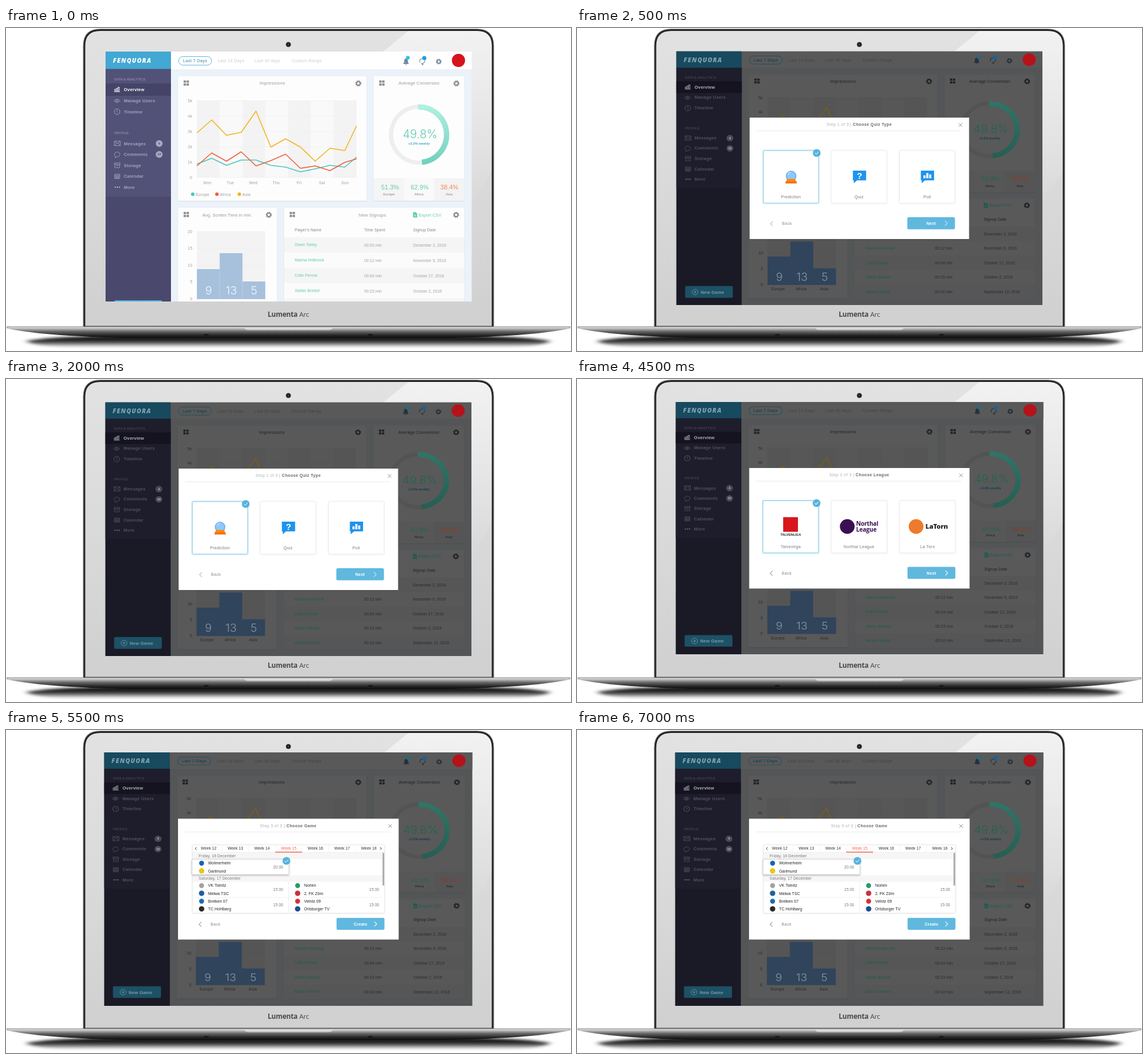
Recreate the animation shown at these times as an HTML page. Size 959 by 548 pixels, loop 8 s.

```html
<!DOCTYPE html>
<html lang="en">
<head>
<meta charset="utf-8">
<title>Dashboard on a laptop</title>
<style>
html, body { margin: 0; width: 100%; height: 100%; overflow: hidden; background: #fff; }
svg { display: block; width: 959px; height: 548px; }
text { font-family: "Liberation Sans", Arial, sans-serif; white-space: pre; }
.light { font-family: Inter, "Liberation Sans", sans-serif; font-weight: 300; }
.brand { font-family: "Open Sans", "Noto Sans", sans-serif; }
.scene { visibility: hidden; animation: 8s step-end infinite; }
#s0 { animation-name: s0; }
#s1 { animation-name: s1; }
#s2 { animation-name: s2; }
#s3 { animation-name: s3; }
@keyframes s0 { 0% { visibility: visible } 6.25%, 100% { visibility: hidden } }
@keyframes s1 { 0% { visibility: hidden } 6.25% { visibility: visible } 37.5%, 100% { visibility: hidden } }
@keyframes s2 { 0% { visibility: hidden } 37.5% { visibility: visible } 68.75%, 100% { visibility: hidden } }
@keyframes s3 { 0% { visibility: hidden } 68.75%, 100% { visibility: visible } }
</style>
</head>
<body>
<svg id="stage" viewBox="0 0 959 548" xmlns="http://www.w3.org/2000/svg"></svg>
<script>
const rect = (x, y, w, h, fill, more = '') =>
  `<rect x="${x}" y="${y}" width="${w}" height="${h}" fill="${fill}" ${more}/>`;
const dot = (x, y, r, fill, more = '') =>
  `<circle cx="${x}" cy="${y}" r="${r}" fill="${fill}" ${more}/>`;
const path = (d, fill, more = '') => `<path d="${d}" fill="${fill}" ${more}/>`;
const line = (d, stroke, w = 1, more = '') =>
  path(d, 'none', `stroke="${stroke}" stroke-width="${w}" ${more}`);
// y is the middle of the capitals
const text = (x, y, s, size, fill, more = '', ls = 0.2) =>
  `<text x="${x}" y="${y + size * 0.36}" font-size="${size}" fill="${fill}" letter-spacing="${ls}" ${more}>${s}</text>`;
const MID = 'text-anchor="middle" ';
const END = 'text-anchor="end" ';
const BOLD = 'font-weight="700" ';

const dim = c => c.replace(/[0-9a-f]{2}/gi, h =>
  Math.round(parseInt(h, 16) * 0.35).toString(16).padStart(2, '0'));

const gear = (x, y, r, c) =>
  dot(x, y, r * 0.62, 'none', `stroke="${c}" stroke-width="${r * 0.42}"`) +
  dot(x, y, r * 0.9, 'none', `stroke="${c}" stroke-width="${r * 0.3}" stroke-dasharray="${r * 0.36} ${r * 0.347}"`);
const tiles = (x, y, c) => [0, 5].map(i => [0, 5].map(j => rect(x + i, y + j, 4, 3.8, c)).join('')).join('');

function sidebar(k) {
  const muted = k('#a3a2c0', '#50505f'), white = k('#ffffff', '#b4b4bc');
  const items = [['Manage Users', 123], ['Timeline', 142], ['Messages', 196], ['Comments', 214],
    ['Storage', 233], ['Calendar', 251.5], ['More', 270]];
  const stroke = d => line(d, muted, 0.9);
  let s = rect(169, 40, 111, 460, k('#4a496d', '#1a1926')) + rect(169, 69, 111, 217, k('#525177', '#1e1d2b')) +
    rect(169, 94, 111, 21, k('#454468', '#14131f')) + rect(169, 40, 111, 29.5, k('#43a8d3', '#17495f')) +
    text(181.5, 55.5, 'FENQUORA', 10.5, k('#ffffff', '#7fa3b0'), 'font-weight="800" font-style="italic" class="brand"', 1.1) +
    text(184, 87, 'DATA &amp; ANALYTICS', 5.6, muted, '', 0.1) + text(184, 178, 'PROFILE', 5.6, muted, '', 0.1) +
    text(200, 104.5, 'Overview', 7.5, white, BOLD);
  for (const [name, y] of items) s += text(200, y, name, 7.5, muted, BOLD);
  s += [0, 1, 2].map(i => rect(184.3 + i * 3, 104 - i * 1.8, 2, 4 + i * 1.8, 'none', `stroke="${white}" stroke-width=".8"`)).join('') +
    stroke('M183.500 108.500h10.500M183 123.500q5-5.500 10.500 0q-5.500 5.500-10.500 0') + dot(188.3, 123.5, 1.6, 'none', `stroke="${muted}"`) +
    dot(188.5, 142, 4.8, 'none', `stroke="${muted}"`) + stroke('M188.500 138.800v3.500l1.500 1.500') +
    stroke('M184 192h10v7.500h-10zM184 192l5 4l5-4M184 199.500l3.500-4M194 199.500l-3.500-4') +
    stroke('M185.500 217.500a4.700 4 0 1 1 3 1l-3 1.500z') +
    stroke('M184 229h9.500v2.500h-9.500zM184.700 231.500v5.500h8v-5.500M187 233.500h3.500') +
    stroke('M184.500 248h8.500v7.500h-8.500zM184.500 250.300h8.500M187.300 250v5.500M190.200 250v5.500M184.500 253h8.500') +
    [185.5, 189, 192.5].map(x => dot(x, 270, 1.1, k('#c5c4d8', '#70707c'))).join('');
  for (const [n, y] of [['4', 196], ['10', 214.5]])
    s += dot(260, y, 5.8, k('#a9a8c4', '#4a4a57')) + text(260, y, n, 5.5, k('#525177', '#c0c0c8'), MID + BOLD, 0);
  return s + rect(184, 462, 81, 21, k('#4fb3dc', '#1d5166'), 'rx="2"') +
    dot(201, 472.8, 5, 'none', `stroke="${k('#ffffff', '#7b9aa6')}" stroke-width=".8"`) +
    line('M198.500 472.800h5M201 470.300v5', k('#ffffff', '#7b9aa6'), 0.8) +
    text(210.5, 473, 'New Game', 7.5, k('#ffffff', '#7b9aa6'), BOLD);
}

function topBar(k) {
  const icon = k('#6d8ba3', '#25323c');
  let s = rect(280, 40, 511, 30, k('#ffffff')) +
    rect(293, 48.5, 56, 14.5, k('#ffffff'), `rx="7.2" stroke="${k('#63b7da', '#1e5067')}" stroke-width="1"`) +
    text(321, 55.5, 'Last 7 Days', 7.4, k('#3c86ad', '#12384a'), MID);
  for (const [x, name] of [[382, 'Last 14 Days'], [444, 'Last 30 days'], [510.5, 'Custom Range']])
    s += text(x, 55.5, name, 7.3, k('#cccccc', '#444444'), MID);
  return s + path('M674 61q2-2 2-6q0-3 3-3.500q3 .5 3 3.500q0 4 2 6zM677.500 61.700h3l-1.500 1.500z', icon) +
    dot(682, 50.5, 3.2, k('#35c3de', '#1f6d80')) +
    line('M703 58.500a4.500 4 0 1 1 4 1.500l1 3l-3-3', icon, 1.1) + dot(710, 51, 3.5, k('#1e9be8', '#17639a')) +
    gear(734.5, 57, 4.6, icon) + dot(768, 55, 11.2, k('#d6141d', '#b5121a'));
}

function lineChart(k) {
  const soft = k('#a0a0a0', '#2d2d2d'), days = ['Mon', 'Tue', 'Wed', 'Thu', 'Fri', 'Sat', 'Sun'];
  const plots = [
    ['#4fc6be', '#24605c', [231, 221, 233, 224, 224, 233, 236, 244, 239, 233, 236, 219]],
    ['#f0603f', '#7a2f20', [234, 212, 226, 210, 234, 225, 214, 238, 234, 242, 228, 222]],
    ['#f2b51f', '#7c5e12', [178, 156, 182, 177, 141, 202, 188, 202, 226, 204, 208, 166]]];
  let s = text(452, 93.5, 'Impressions', 7.5, k('#999999', '#222222'), MID, 0.3);
  days.forEach((d, i) => s += rect(324 + i * 38.7, 123, 38.7, 131, k(i % 2 ? '#f9f9f9' : '#f3f3f3')) +
    text(342 + i * 38.9, 263, d, 6.8, soft, MID));
  ['5k', '4k', '3k', '2k', '1k', '0'].forEach((v, i) => s += text(316, 123.500 + i * 26, v, 6.8, soft, END) +
    line(`M324 ${123.500 + i * 26}h271`, k('#efefef'), 0.6));
  for (const [c, d, ys] of plots)
    s += line('M' + ys.map((y, i) => `${Math.min(324 + i * 25.1, 595)} ${y}`).join('L'), k(c, d), 1.6, 'stroke-linejoin="round"');
  [['Europe', 317], ['Africa', 358], ['Asia', 396]].forEach(([n, x], i) =>
    s += dot(x, 282, 3, k(plots[i][0], plots[i][1])) + text(x + 5, 282.3, n, 6.8, soft));
  return s;
}

function donut(k, id) {
  const green = k('#62c9b0', '#1f6454');
  let s = text(701, 93.5, 'Average Conversion', 7.5, k('#999999', '#222222'), MID, 0.1) +
    dot(701, 181, 47.5, 'none', `stroke="${k('#eeeeee')}" stroke-width="7"`) +
    `<linearGradient id="ring${id}" x1="0" y1="0" x2="0" y2="1"><stop stop-color="${k('#aef0e1', '#2f7565')}"/>` +
    `<stop offset="1" stop-color="${k('#74d0bd', '#265f53')}"/></linearGradient>` +
    line('M699.500 134A47 47 0 0 1 706 227.700', `url(#ring${id})`, 9) +
    text(703, 179.5, '49.8%', 19.5, green, MID + 'class="light"', 0) +
    text(701, 196.3, '+3.2% weekly', 5.7, k('#46a9d6', '#153c4e'), MID + BOLD, 0);
  [['51.3%', 'Europe', '#f5f5f5'], ['62.9%', 'Africa', '#f9f9f9'], ['38.4%', 'Asia', '#f3f3f3']].forEach(([v, n, bg], i) =>
    s += rect(624 + i * 51.4, 255, 51.4, 38, k(bg)) +
      text(652 + i * 50.3, 270, v, 10.6, i < 2 ? green : k('#f2875a', '#8c3c25'), MID, 0.1) +
      text(650 + i * 51, 281.7, n, 6, k('#888888', '#222222'), MID, 0));
  return s;
}

function barChart(k) {
  const soft = k('#a0a0a0', '#2a2a2a');
  let s = text(375.5, 317, 'Avg. Screen Time in min.', 7.5, k('#999999', '#222222'), MID, 0.05) +
    rect(324, 345, 116, 115, k('#f3f3f3'));
  for (let i = 0; i < 5; i++) s += text(316.5, 345.500 + i * 28.5, 20 - i * 5, 6.8, soft, END) +
    line(`M324 ${345.500 + i * 28.5}h116`, k('#ebebeb'), 0.6);
  [['Europe', 9, 409], ['Africa', 13, 382], ['Asia', 5, 430]].forEach(([n, v, y], i) =>
    s += rect(324 + i * 38.7, y, 38.7, 460 - y, k('#a7c1dd', '#30445b')) +
      text(344 + i * 38.5, 445.5, v, 19, k('#f4f8fc', '#8b95a0'), MID + 'class="light"', 0) +
      text(342 + i * 39, 467.5, n, 6.8, soft, MID));
  return s;
}

function signups(k) {
  const green = k('#5ccbb0', '#1e5c4e'), soft = k('#a3a3a3', '#2c2c2c');
  const rows = [['Owen Tarley', '03', 'December 2, 2016'], ['Marina Holbrook', '12', 'November 9, 2016'],
    ['Colin Ferrow', '04', 'October 17, 2016'], ['Stefan Brinkel', '23', 'October 2, 2016'],
    ['Adrian Velmer', '10', 'September 12, 2016']];
  let s = text(622, 317, 'New Signups', 7.5, k('#999999', '#222222'), MID) +
    path('M691 312.500h4.500l2.500 2.500v6.500h-7z', green) + line('M692.500 317h4M692.500 319h4', k('#ffffff'), 0.7) +
    text(700.5, 317, 'Export CSV', 7, green) +
    text(490, 343, "Player's Name", 6.8, k('#888888', '#222222'), '', 0.1) +
    text(608, 343, 'Time Spent', 6.8, k('#888888', '#222222'), '', 0.1) +
    text(691, 342.3, 'Signup Date', 6.8, k('#888888', '#222222'), '', 0.1);
  rows.forEach(([n, m, d], i) => {
    const y = 368 + i * 26;
    s += rect(472, y - 13, 306, 26, k(i % 2 ? '#fbfbfb' : '#f5f5f5')) + text(490, y, n, 6.8, green, '', 0) +
      text(608, y + 0.3, `00:${m} min`, 6.8, soft, '', 0) + text(691, y + 0.3, d, 6.8, soft, '', 0);
  });
  return s;
}

function dashboard(id, dark) {
  const k = (c, d) => dark ? d || dim(c) : c;
  const icon = k('#8d8d8d', '#222222');
  let s = rect(169, 40, 622, 460, k('#ecf2f9')) + sidebar(k) + topBar(k);
  for (const [x, y, w, h, g] of [[292, 82, 320, 211, 598], [624, 82, 154, 211, 764.5], [292, 305, 168, 179, 446], [472, 305, 306, 179, 764]])
    s += rect(x - 0.5, y + 0.5, w + 1, h + 1, k('#dde4ec'), 'rx="1"') + rect(x, y, w, h, k('#fdfdfd'), 'rx="1"') +
      tiles(x + 9.5, y + 7, icon) + gear(g, y + 12, 5, icon);
  return s + lineChart(k) + donut(k, id) + barChart(k) + signups(k);
}

const check = (x, y) => dot(x, y, 6.6, '#55b3de') + line(`M${x - 3} ${y}l2.200 2.200l4-4.200`, '#fff', 1);

// drawn at 293,152 with size 373 x 206, then fitted to the box
function modal(x, y, w, h, step, title, button, body) {
  return `<g transform="translate(${x} ${y}) scale(${w / 373} ${h / 206}) translate(-293 -152)">` +
    rect(293, 152, 373, 206, '#fff') +
    text(479.3, 164, `Step ${step} of 3 | <tspan fill="#666" font-weight="700">${title}</tspan>`, 6.9, '#b0b0b0', MID, 0.42) +
    line('M648.500 161.500l6 6M654.500 161.500l-6 6', '#888', 0.9) + line('M304 174.500h348', '#e9ebee') + body +
    line('M332.500 328l-4 4l4 4', '#999') + text(348, 331.7, 'Back', 7, '#888', '', 0.35) +
    rect(561, 321, 81, 20.5, '#60b8df', 'rx="2.5"') + text(601.5, 331.5, button, 7, '#fff', MID + BOLD) +
    line('M625 327.500l4 4l-4 4', '#fff') + '</g>';
}

const options = (names, icons) => names.map((n, i) => {
  const x = 316.3 + i * 115.8;
  return rect(x, 208, 94, 89, '#fff', `rx="1" stroke="${i ? '#eeeeee' : '#86cbe8'}" filter="url(#${i ? 'soft' : 'glow'})"`) +
    icons[i] + text(x + 47, 286, n, 7, '#777', MID, 0.3);
}).join('') + check(407, 212);

const bubble = x => path(`M${x} 242h22.500v16.500h-15.500l-5.500 5v-5h-1.500z`, '#1f93ee');
const quizTypes = options(['Prediction', 'Quiz', 'Poll'], [
  dot(363.5, 251, 9, '#72b5f3') + dot(363.5, 251, 7, '#8fc8fa') + line('M358 249q1.500-4 5-4.500', '#d8eeff', 1.2) +
    path('M356.500 256h14l2.500 7.500h-19z', '#ff8a0f') + rect(354, 260.5, 19, 3, '#f26d0c'),
  bubble(468.5) + text(479.8, 250.5, '?', 15, '#fff', MID + BOLD, 0),
  bubble(584) + rect(588.5, 250, 3.5, 5, '#fff') + rect(593.3, 246, 3.5, 9, '#fff') + rect(598.2, 248.5, 3.5, 6.5, '#fff')]);

const leagues = options(['Talvenliga', 'Northal League', 'La Torn'], [
  rect(350.5, 236, 25, 25, '#d8161e') + text(363.3, 266, 'TALVENLIGA', 5.6, '#222', MID + BOLD, 0),
  dot(459, 252, 12.5, '#3b1053') + text(474, 247.5, 'Northal', 10, '#3b1053', BOLD + 'class="brand"', -0.2) +
    text(474, 257.5, 'League', 10, '#3b1053', BOLD + 'class="brand"', -0.2),
  dot(575.5, 252, 12.5, '#ee7a2b') + text(591.5, 252, 'LaTorn', 11, '#222', 'font-weight="800" class="brand"', -0.1)]);

function fixtures() {
  let s = rect(316.5, 195, 326, 115.5, '#fff', 'rx="1" stroke="#ebebeb" filter="url(#soft)"') +
    rect(317, 208, 322, 11, '#f6f6f6') + rect(317, 246.5, 322, 11, '#f6f6f6') +
    line('M317 207.700h325M317 284h322', '#ececec', 0.8) + line('M479.500 219v27M479.500 257.500v53', '#ececec', 0.8);
  for (let i = 0; i < 7; i++) {
    const on = i === 3;
    s += text(344 + i * 45.3, 201, `Week ${12 + i}`, 6.6, on ? '#ee6a55' : '#333', MID, 0.05);
    if (i) s += line(`M${321.200 + i * 45.3} 196v11`, '#efefef', 0.7);
  }
  s += rect(457, 206.5, 45.5, 1.5, '#ee6a55') + line('M323.500 198.800l-2.300 2.300l2.300 2.300M635 198.800l2.300 2.300l-2.300 2.300', '#333') +
    text(327, 213.3, 'Friday, 16 December', 6.5, '#777', '', 0.15) +
    text(327, 252, 'Saturday, 17 December', 6.5, '#777', '', 0.15) +
    rect(316, 219.5, 164, 25.5, '#fff', 'stroke="#d5d5d5" stroke-width=".7" filter="url(#lift)"');
  const games = [
    [332, 226, '20:30', 'Wolmerheim', '#1c62b8', 'Garlmund', '#e8c812'],
    [332, 264, '15:30', 'VK Tolnitz', '#a3a3a3', 'Melwa TSC', '#1f5f9f'],
    [332, 290.5, '15:30', 'Brelken 07', '#1d6cb5', 'TC Hohlbarg', '#2a2a2a'],
    [495, 264, '15:30', 'Norlen', '#2a9b6c', '2. FK Zörn', '#c8323c'],
    [495, 290.5, '15:30', 'Velntz 09', '#d8303c', 'Orlsburger TV', '#1c4f93']];
  for (const [x, y, time, a, ca, b, cb] of games)
    s += dot(x, y, 4.2, ca) + dot(x, y + 13, 4.6, cb) + text(x + 11, y, a, 6.8, '#222', '', 0.05) +
      text(x + 11, y + 13.2, b, 6.8, '#222', '', 0.05) + text(x + 130, y + 6.5, time, 6.6, '#777', MID, 0.1);
  return s + rect(639, 208, 3, 56, '#b0b0b0', 'rx="1.5"') + check(476, 222);
}

function scene(i, [l, t, r, b, sy], over) {
  const m = `translate(${l} ${t}) scale(${(r - l) / 621.5} ${sy}) translate(-169 -40)`;
  return `<clipPath id="c${i}">${rect(l, t, r - l, b - t, '#000')}</clipPath><g id="s${i}" class="scene">` +
    `<g clip-path="url(#c${i})"><g transform="${m}">${dashboard(i, i > 0)}</g></g>${over}</g>`;
}

const grad = (id, stops, dir = 'x2="0" y2="1"') => `<linearGradient id="${id}" ${dir}>` +
  stops.map(([o, c, a = 1]) => `<stop offset="${o}" stop-color="${c}" stop-opacity="${a}"/>`).join('') + '</linearGradient>';
const shadow = (id, dy, blur, c, a) => `<filter id="${id}" x="-20%" y="-20%" width="140%" height="140%">` +
  `<feDropShadow dx="0" dy="${dy}" stdDeviation="${blur}" flood-color="${c}" flood-opacity="${a}"/></filter>`;

const defs = '<defs>' + grad('lid', [[0, '#e2e2e2'], [0.5, '#dadada'], [1, '#d0d0d0']]) +
  grad('glare', [[0, '#fff', 0.55], [1, '#fff', 0]]) +
  grad('base', [[0, '#c9c9c9'], [0.22, '#a8a8a8'], [0.4, '#6a6a6a'], [0.75, '#262626'], [1, '#0c0c0c']]) +
  grad('notch', [[0, '#bcbcbc'], [0.5, '#e6e6e6'], [1, '#a6a6a6']]) +
  grad('floor', [[0, '#000', 1], [0.45, '#000', 0.8], [1, '#000', 0]]) +
  shadow('soft', 0.3, 1, '#000', 0.12) + shadow('glow', 0, 1.6, '#5db8e0', 0.55) + shadow('lift', 1, 1.5, '#000', 0.4) +
  '<filter id="blur" x="-5%" y="-60%" width="110%" height="220%"><feGaussianBlur stdDeviation="6 2"/></filter></defs>';

const lidShape = 'M133 507V30Q133 3.500 160 3.500H799Q826 3.500 826 30V507z';
const laptop = path('M35 531Q70 524 160 523H800Q890 524 923 531Q915 540 840 542H118Q45 540 35 531z', 'url(#floor)', 'filter="url(#blur)"') +
  path(lidShape, 'url(#lid)', 'stroke="#a8a8a8" stroke-width="5"') +
  path(lidShape, 'url(#lid)', 'stroke="#262626" stroke-width="3"') +
  path('M683 5H799Q824.500 5 824.500 30V243L790 300V40H640z', 'url(#glare)') +
  dot(479.3, 28, 4.6, '#8a8a8a') + dot(479.3, 28, 3.8, '#1c1c1c') + dot(479.3, 28, 1.3, '#555') +
  text(479.3, 485.5, '<tspan font-weight="700">Lumenta</tspan> Arc', 11.6, '#484848', MID + 'class="brand"', -0.2) +
  path('M1 507H958V509.500Q915 519 830 523Q800 525.500 740 526H219Q159 525.500 129 523Q44 519 1 509.500z', 'url(#base)') +
  rect(1, 506.3, 957, 1.2, '#8e8e8e') + rect(4, 507.5, 951, 2, '#d2d2d2') +
  path('M403.500 507H555.500Q554 513 546 513H413Q405 513 403.500 507z', 'url(#notch)') +
  rect(336, 519.5, 8, 2, '#111', 'rx="1"') + rect(614.5, 519.5, 8, 2, '#111', 'rx="1"');

document.getElementById('stage').innerHTML = defs + laptop +
  scene(0, [169, 40, 790.5, 464, 1], '') +
  scene(1, [168.5, 39.5, 790, 470, 0.944],
    modal(293, 152, 372.5, 206, 1, 'Choose Quiz Type', 'Next', quizTypes)) +
  scene(2, [167.5, 39, 791.5, 467, 0.937],
    modal(292.3, 151, 374, 204.5, 2, 'Choose League', 'Next', leagues)) +
  scene(3, [166.5, 38, 791.5, 468, 0.94],
    modal(292, 150.5, 374.5, 205, 3, 'Choose Game', 'Create', '') + fixtures());
</script>
</body>
</html>
```
